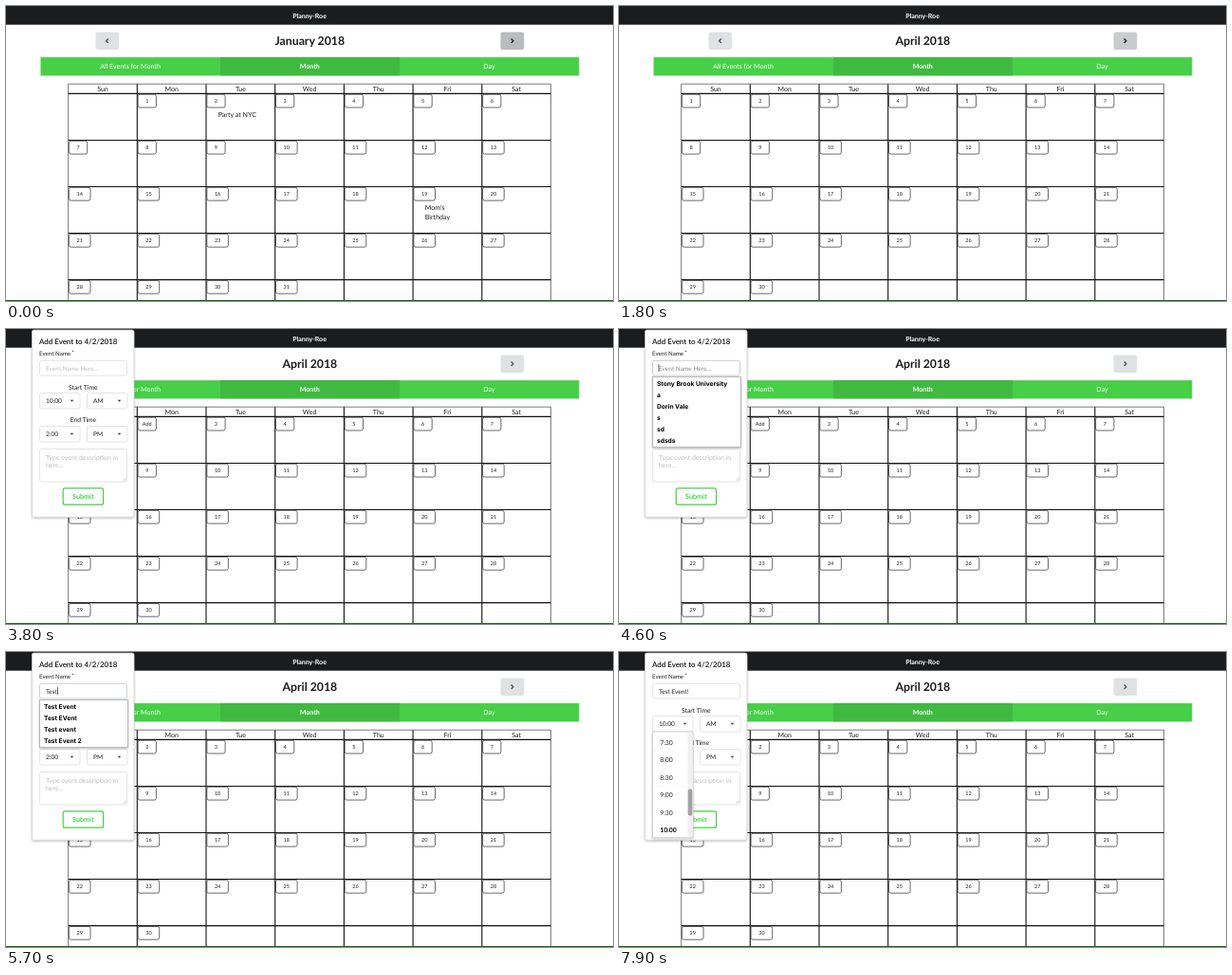
These frames come from a looping animation (640 px wide and 311 px high, 8000 ms). An HTML page:

```html
<!DOCTYPE html>
<html lang="en">
<head>
<meta charset="utf-8">
<title>Calendar</title>
<style>
  html, body { margin: 0; width: 100%; height: 100%; overflow: hidden; background: #fff; }
  svg { display: block; width: 640px; height: 311px; }
  text { font-family: Lato, sans-serif; text-rendering: geometricPrecision; white-space: pre; }
  .list text { font-family: Inter, sans-serif; }
</style>
</head>
<body>
<svg id="stage" viewBox="0 0 640 311"></svg>
<script>
const LOOP = 8000;
const GREEN = '#46cf47';
const INK = '#1c1c1c';
const stage = document.getElementById('stage');
const $ = id => document.getElementById(id);

// y is the middle of the capitals
function text(str, x, y, size, { fill = INK, weight = 400, anchor = 'start', id = '' } = {}) {
  return `<text id="${id}" x="${x}" y="${(y + size * 0.36).toFixed(2)}" font-size="${size}" ` +
    `font-weight="${weight}" text-anchor="${anchor}" fill="${fill}">${str}</text>`;
}
const mid = (str, x, y, size, opts) => text(str, x, y, size, { ...opts, anchor: 'middle' });
const box = (x, y, w, h, attrs) => `<rect x="${x}" y="${y}" width="${w}" height="${h}" ${attrs}/>`;
const path = (d, attrs) => `<path d="${d}" ${attrs}/>`;
const group = (id, body, attrs = '') => `<g id="${id}" ${attrs}>${body}</g>`;

// Centres of the grid lines
const colX = i => 65.6 + 72.7 * i;
const rowY = i => 92.4 + 49.05 * i;

function dayButton(month, day, col, row) {
  const x = colX(col) + 0.8, y = rowY(row) + 0.8, w = day < 10 ? 19.3 : 22.6;
  const clip = `clip-${month}-${day}`;
  const shape = box(x, y, w, 13.8, 'rx="2"');
  const label = mid(day, x + w / 2, y + 7, 5.5, { id: `num-${month}-${day}` });
  const hover = month === 3 && HOVERS[day]
    ? mid('Add', x + w / 2, y + 7, 5.5, { id: `add-${day}` }) : '';
  return `<clipPath id="${clip}">${shape}</clipPath>` +
    `<g clip-path="url(#${clip})">${label}${hover}</g>` +
    box(x, y, w, 13.8, 'rx="2" fill="none" stroke="#444" stroke-width=".8"');
}

function monthView({ name, first, days, events }, month) {
  let out = mid(`${name} 2018`, 320.3, 36.7, 12.28, { weight: 700 });
  for (let day = 1; day <= days; day++) {
    const cell = first + day - 1, col = cell % 7, row = Math.floor(cell / 7);
    out += dayButton(month, day, col, row);
    (events[day] || []).forEach((line, i) => {
      out += text(line, colX(col) + 12.7, rowY(row) + 22.2 + 10 * i, 7.1);
    });
  }
  return group(`month${month}`, out);
}

// Neighbouring cells share a double line, the outer edge is a single thin one
function grid() {
  const left = colX(0), right = colX(7);
  let inner = '';
  for (let i = 0; i < 5; i++) inner += `M${left} ${rowY(i)}H${right}`;
  for (let i = 1; i < 7; i++) inner += `M${colX(i)} 82.2V311`;
  return path(inner, 'stroke="#111" stroke-width="1.1" fill="none"') +
    path(`M${left} 311V82.2H${right}V311`, 'stroke="#222" stroke-width=".6" fill="none"') +
    ['Sun', 'Mon', 'Tue', 'Wed', 'Thu', 'Fri', 'Sat']
      .map((name, i) => mid(name, colX(i) + 36.4, 87.3, 7)).join('');
}

function page() {
  const tab = (label, x, weight) => mid(label, x, 63.8, 7.05, { fill: '#fff', weight });
  const chevron = 'fill="none" stroke-width="1.4"';
  return box(0, 0, 640, 19.7, 'fill="#1b1c1d"') +
    mid('Planny-Roe', 320, 10.2, 7, { fill: '#fff', weight: 700 }) +
    box(94.5, 27.5, 24.5, 18.5, 'rx="2" fill="#e0e1e2"') +
    path('M107.8 34.4l-2.2 2.3l2.2 2.3', `${chevron} stroke="#555"`) +
    box(521.5, 27.5, 24.7, 18.5, 'rx="2" id="next"') +
    path('M532.6 34.4l2.2 2.3l-2.2 2.3', `${chevron} id="nextMark"`) +
    box(36.5, 54, 567.7, 19.3, `fill="${GREEN}" stroke="#a9dca9" stroke-width=".6"`) +
    box(226, 54, 189, 19.3, 'fill="#40b941"') +
    tab('All Events for Month', 131, 400) + tab('Month', 320.2, 700) + tab('Day', 509.5, 400) +
    grid();
}

function select(value, x, y) {
  return box(x + 0.5, y + 0.5, 42.5, 16.5, 'rx="2" fill="#fff" stroke="#dedede" stroke-width=".8"') +
    text(value, x + 7, y + 8.8, 6.6) +
    path(`M${x + 32.7} ${y + 7.7}h3.5l-1.75 2.1z`, 'fill="#333"');
}

function listBox(id, items) {
  const h = 12 * items.length + 2;
  return group(id, box(35.5, 50.5, 93, h, 'fill="#fff" stroke="#a8a8a8" stroke-width=".8" filter="url(#shade)"') +
    items.map((item, i) => text(item, 40, 57.4 + 12 * i, 6.65, { weight: 700, fill: '#000' })).join(''),
    'class="list"');
}

function timeList() {
  const times = ['7:30', '8:00', '8:30', '9:00', '9:30', '10:00'];
  const rows = times.map((time, i) => {
    const y = 95.2 + 18.5 * i, last = i === 5;
    return (i ? path(`M36 ${y - 9.2}H72`, 'stroke="#f6f6f6" stroke-width=".6"') : '') +
      text(time, 43.2, y, 6.8, { weight: last ? 700 : 400, fill: last ? '#000' : INK });
  });
  return group('times',
    box(35.5, 84, 42.5, 111.8, 'fill="#fff" stroke="#c4c8ca" stroke-width=".8" filter="url(#shade)"') +
    rows.join('') +
    box(72.5, 84.5, 5, 110.8, 'fill="#f0f0f0"') +
    box(72.7, 144.6, 4.6, 28, 'rx="2" fill="#a3a3a3"'));
}

function popup() {
  const pale = { fill: '#bdbdbd' };
  return group('popup',
    box(27.4, 1.1, 107.6, 197.2, 'rx="2" fill="#fff" stroke="#d0d0d1" stroke-width=".8" filter="url(#shade)"') +
    path('M135 97.6l2.4 2.4l-2.4 2.4', 'fill="#fff" stroke="#c6c6c7" stroke-width=".8"') +
    text('Add Event to 4/2/2018', 35, 13.2, 7.95, { fill: '#000', weight: 500 }) +
    text('Event Name', 35, 26, 6.2) + text('*', 69.3, 24.4, 6.2) +
    box(35.5, 33.3, 92, 15.7, 'id="field" rx="2" fill="#fff" stroke-width=".8"') +
    text('Event Name Here...', 42, 41.2, 6.5, { id: 'hint' }) +
    text('', 42, 41.2, 6.5, { id: 'typed' }) +
    box(0, 37.2, 0.7, 8, 'id="caret" fill="#222"') +
    mid('Start Time', 81.3, 61.5, 6.8) +
    select('10:00', 35, 67) + select('AM', 85, 67) +
    mid('End Time', 81.5, 96, 6.7) +
    select('2:00', 35, 102) + select('PM', 85, 102) +
    box(35.5, 126.5, 92, 34.5, 'rx="2" fill="#fff" stroke="#dedede" stroke-width=".8"') +
    text('Type event description in', 42, 135.2, 6.9, pale) + text('here...', 42, 143.4, 6.9, pale) +
    path('M123.6 159.6l3-3M125.4 159.6l1.2-1.2', 'stroke="#999" stroke-width=".5"') +
    box(60.2, 167.8, 42.4, 17.4, `rx="2" fill="#fff" stroke="${GREEN}" stroke-width="1.2"`) +
    mid('Submit', 81.3, 176.6, 7.2, { weight: 700, fill: GREEN }) +
    listBox('recent', ['Stony Brook University', 'a', 'Dorin Vale', 's', 'sd', 'sdsds']) +
    listBox('matches', ['Test Event', 'Test EVent', 'Test event', 'Test Event 2']) +
    listBox('single', ['Test Event 2']) +
    timeList());
}

const MONTHS = [
  { name: 'January', first: 1, days: 31, events: { 2: ['Party at NYC'], 19: ["Mom's", 'Birthday'] } },
  { name: 'February', first: 4, days: 28, events: {} },
  { name: 'March', first: 4, days: 31, events: { 1: ['Test Event'], 20: ['Test Event 2'] } },
  { name: 'April', first: 0, days: 30, events: {} },
];

// Timeline, in ms
const MONTH_STEPS = [[0, 0], [100, 1], [1100, 2], [1500, 3]];
const NEXT_GREY = [[0, 186], [100, 186], [200, 202], [1099, 202], [1100, 186], [1200, 202],
  [1350, 202], [1420, 186], [1500, 186], [1600, 202], [3450, 202], [3550, 224]];
const HOVERS = { 4: [2550, 2660], 3: [2915, 3070], 2: [3100, 4600] };
const TYPING = [[0, '', ''], [4600, '', 'recent'], [5100, 'T', 'matches'], [5300, 'Te', 'matches'],
  [5400, 'Tes', 'matches'], [5600, 'Test', 'matches'], [5800, 'Test ', 'matches'],
  [6000, 'Test E', 'matches'], [6100, 'Test Ev', 'matches'], [6200, 'Test Eve', 'matches'],
  [6250, 'Test Even', 'matches'], [6300, 'Test Event', 'matches'], [6700, 'Test Event ', 'single'],
  [7200, 'Test Event', 'matches'], [7300, 'Test Event!', '']];
const POPUP_AT = 3800, FOCUS_AT = 4600, BLUR_AT = 7600, OPEN_AT = 7650;

const clamp = v => Math.max(0, Math.min(1, v));
const stepAt = (steps, t) => steps.filter(s => s[0] <= t).pop();
const show = (id, on) => $(id).setAttribute('display', on ? 'inline' : 'none');
const set = (id, name, value) => $(id).setAttribute(name, value);

function lerpAt(steps, t) {
  const i = steps.findIndex(s => s[0] > t);
  if (i < 0) return steps[steps.length - 1][1];
  const [t0, a] = steps[i - 1], [t1, b] = steps[i];
  return a + (b - a) * (t - t0) / (t1 - t0);
}

// The standard CSS "ease" curve
function ease(x) {
  x = clamp(x);
  const bez = (u, a, b) => 3 * u * (1 - u) ** 2 * a + 3 * u * u * (1 - u) * b + u ** 3;
  let lo = 0, hi = 1;
  for (let i = 0; i < 20; i++) {
    const u = (lo + hi) / 2;
    if (bez(u, 0.25, 0.25) < x) lo = u; else hi = u;
  }
  return bez(lo, 0.1, 1);
}

function drawHovers(t) {
  for (const [day, [enter, leave]] of Object.entries(HOVERS)) {
    const p = ease((Math.min(t, leave) - enter) / 300) * (1 - ease((t - leave) / 300));
    set(`num-3-${day}`, 'transform', `translate(${-19 * p} 0)`);
    set(`add-${day}`, 'transform', `translate(${20 * (1 - p)} 0)`);
  }
}

function drawPopup(t) {
  show('popup', t >= POPUP_AT);
  if (t < POPUP_AT) return;
  const [, value, list] = stepAt(TYPING, t);
  const focused = t >= FOCUS_AT && t < BLUR_AT;
  const typed = $('typed');
  typed.textContent = value;
  show('hint', !value);
  set('hint', 'fill', focused ? '#858585' : '#bdbdbd');
  set('field', 'stroke', focused ? '#bcc4c8' : '#dedede');
  show('caret', focused);
  set('caret', 'x', 41.6 + (value ? typed.getComputedTextLength() + 0.8 : 0));
  for (const id of ['recent', 'matches', 'single']) show(id, id === list);

  const open = ease((t - OPEN_AT) / 200);
  show('times', open > 0);
  set('times', 'opacity', open);
  set('times', 'transform', `translate(0 84) scale(1 ${open}) translate(0 -84)`);
}

function draw(t) {
  const current = stepAt(MONTH_STEPS, t)[1];
  MONTHS.forEach((_, i) => show(`month${i}`, i === current));
  const g = Math.round(lerpAt(NEXT_GREY, t));
  set('next', 'fill', `rgb(${g},${g + 1},${g + 2})`);
  set('nextMark', 'stroke', g > 212 ? '#555' : '#222');
  drawHovers(t);
  drawPopup(t);
}

stage.innerHTML =
  '<defs><filter id="shade" x="-10%" y="-20%" width="120%" height="150%">' +
  '<feDropShadow dx="0" dy="1" stdDeviation="1" flood-opacity=".25"/></filter></defs>' +
  page() + MONTHS.map(monthView).join('') + popup() +
  box(0, 310, 640, 1, 'fill="#0b6b0b"');

const begin = performance.now();
function tick() {
  draw((performance.now() - begin) % LOOP);
  requestAnimationFrame(tick);
}
tick();
</script>
</body>
</html>
```
